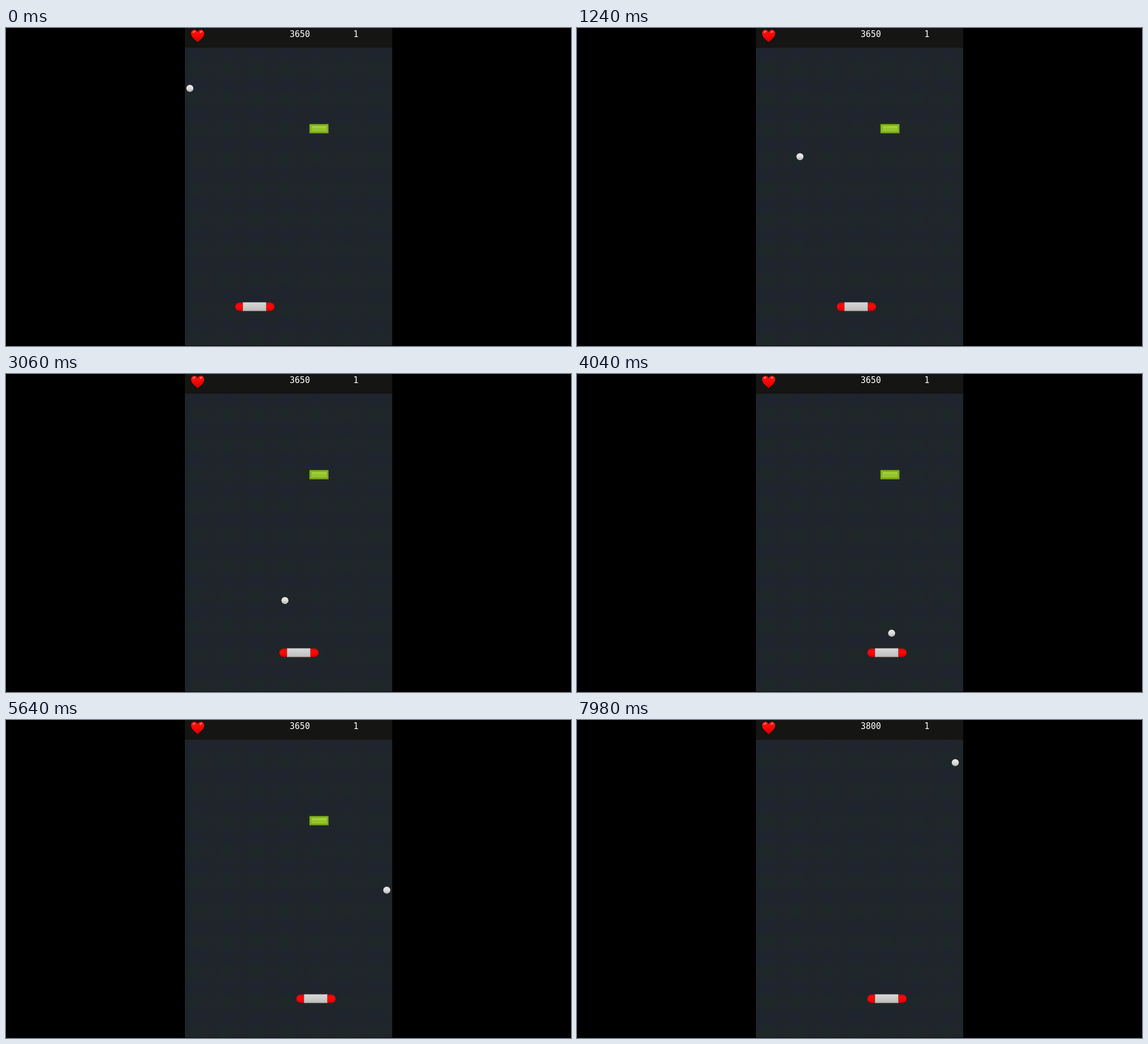
An HTML page with a canvas that plays this animation: 998x561 px, repeating every 8 s.

```html
<!DOCTYPE html>
<html lang="en">
<head>
<meta charset="utf-8">
<title>Brick game</title>
<style>
  html, body { margin: 0; width: 100%; height: 100%; overflow: hidden; background: #000; }
  canvas { display: block; }
</style>
</head>
<body>
<canvas id="stage" width="998" height="561"></canvas>
<script>
const LOOP = 8000;
const FIELD = { x: 316, y: 35, w: 366.5, h: 525.5 };
const BRICK_HIT = 6780;

// Key poses: time, then coordinates; motion between them is linear.
const BALL = [
  [0, 324.8, 106.5], [1240, 393.8, 227], [3060, 492.7, 399.7],
  [3858, 536.5, 477], [4040, 555.8, 457.3], [5587, 677, 305.3],
  [5640, 672.6, 300.2], [6580, 591.8, 206.2], [BRICK_HIT, 575.5, 187],
  [7980, 668.2, 75.2], [8000, 669.7, 73.3]
];
const PADDLE = [
  [0, 405], [300, 405], [900, 459], [1700, 459],
  [2020, 483], [3680, 483], [3980, 513], [8000, 513]
];

const canvas = document.getElementById('stage');
const ctx = canvas.getContext('2d');

function pose(keys, t) {
  const i = Math.max(1, keys.findIndex(key => key[0] >= t));
  const a = keys[i - 1], b = keys[i];
  const u = (t - a[0]) / (b[0] - a[0]);
  return a.slice(1).map((v, k) => v + (b[k + 1] - v) * u);
}

// The picture advances in an uneven rhythm: hold 100 ms, then two holds of 20 ms.
function heldTime(t) {
  if (t < 20) return 0;
  const shift = t < 4520 ? 20 : 40;
  const phase = (t - shift) % 140;
  return t - phase + (phase < 100 ? 0 : phase < 120 ? 100 : 120);
}

function rect(g, color, x, y, w, h) {
  g.fillStyle = color;
  g.fillRect(x, y, w, h);
}

function vertical(g, y0, y1, ...colors) {
  const grad = g.createLinearGradient(0, y0, 0, y1);
  colors.forEach((c, i) => grad.addColorStop(i / (colors.length - 1), c));
  return grad;
}

function glow(g, x, y, rgb) {
  const grad = g.createRadialGradient(x, y, 0, x, y, 25);
  grad.addColorStop(0, `rgba(${rgb},.65)`);
  grad.addColorStop(1, `rgba(${rgb},0)`);
  rect(g, grad, x - 25, y - 25, 50, 50);
}

function drawHeart(g) {
  g.beginPath();
  g.moveTo(338.5, 25);
  g.bezierCurveTo(334, 21, 327, 16, 327, 9.5);
  g.bezierCurveTo(327, 2, 336, 1, 338.5, 7.5);
  g.bezierCurveTo(341, 1, 350, 2, 350, 9.5);
  g.bezierCurveTo(350, 16, 343, 21, 338.5, 25);
  g.fillStyle = vertical(g, 3, 25, '#ff1710', '#fb0503', '#c90000');
  g.fill();
  g.fillStyle = 'rgba(255,140,125,.75)';
  for (const x of [332, 344.5]) {
    g.beginPath();
    g.ellipse(x, 6.7, 2.6, 1.5, -.5, 0, Math.PI * 2);
    g.fill();
  }
}

function makeBackdrop() {
  const layer = document.createElement('canvas');
  layer.width = 998;
  layer.height = 561;
  const g = layer.getContext('2d');
  rect(g, '#000', 0, 0, 998, 561);
  g.save();
  g.beginPath();
  g.rect(FIELD.x, 0, FIELD.w, 560.5);
  g.clip();
  rect(g, '#20252b', FIELD.x, FIELD.y, FIELD.w, FIELD.h);
  for (let x = 338; x < 700; x += 52.5) {
    for (let y = 47; y < 575; y += 53.2) {
      glow(g, x, y, '29,36,51');
      glow(g, x, y + 26.6, '28,42,37');
    }
  }
  rect(g, '#151513', FIELD.x, 0, FIELD.w, FIELD.y);
  g.restore();
  drawHeart(g);
  return layer;
}

function drawBrick() {
  rect(ctx, '#668f13', 535.8, 169.3, 34, 16.7);
  rect(ctx, '#86b51f', 536.8, 170.2, 32, 14);
  rect(ctx, vertical(ctx, 173, 182, '#a5d23c', '#93c528'), 540, 173, 26, 9);
  rect(ctx, '#86b722', 541, 177.6, 24, 1);
}

function drawPaddle(x) {
  ctx.beginPath();
  ctx.roundRect(x, 484.3, 69, 15, 7.5);
  ctx.fillStyle = vertical(ctx, 484, 500, '#e00000', '#ff0808', '#fa0000', '#bd0000');
  ctx.fill();
  rect(ctx, '#77716f', x + 13, 483.6, 42, 16);
  rect(ctx, vertical(ctx, 484, 499, '#d8d8d8', '#cbcbcb', '#bdbdbd'), x + 13.7, 484.2, 40.5, 14.6);
}

function drawBall(x, y) {
  ctx.beginPath();
  ctx.arc(x, y, 6.2, 0, Math.PI * 2);
  ctx.fillStyle = vertical(ctx, y - 6, y + 6, '#e9e9e7', '#dededc', '#b4b4b2');
  ctx.fill();
}

const backdrop = makeBackdrop();

function draw(now) {
  const t = heldTime(now % LOOP);
  const brickGone = t >= BRICK_HIT;
  ctx.drawImage(backdrop, 0, 0);
  ctx.font = '15px "DejaVu Sans Mono", monospace';
  ctx.fillStyle = '#fff';
  ctx.fillText(brickGone ? '3800' : '3650', 501, 16);
  ctx.fillText('1', 613.6, 16);
  if (!brickGone) drawBrick();
  drawPaddle(pose(PADDLE, t)[0]);
  drawBall(...pose(BALL, t));
}

const start = performance.now();
function tick() {
  draw(performance.now() - start);
  requestAnimationFrame(tick);
}
tick();
</script>
</body>
</html>
```
